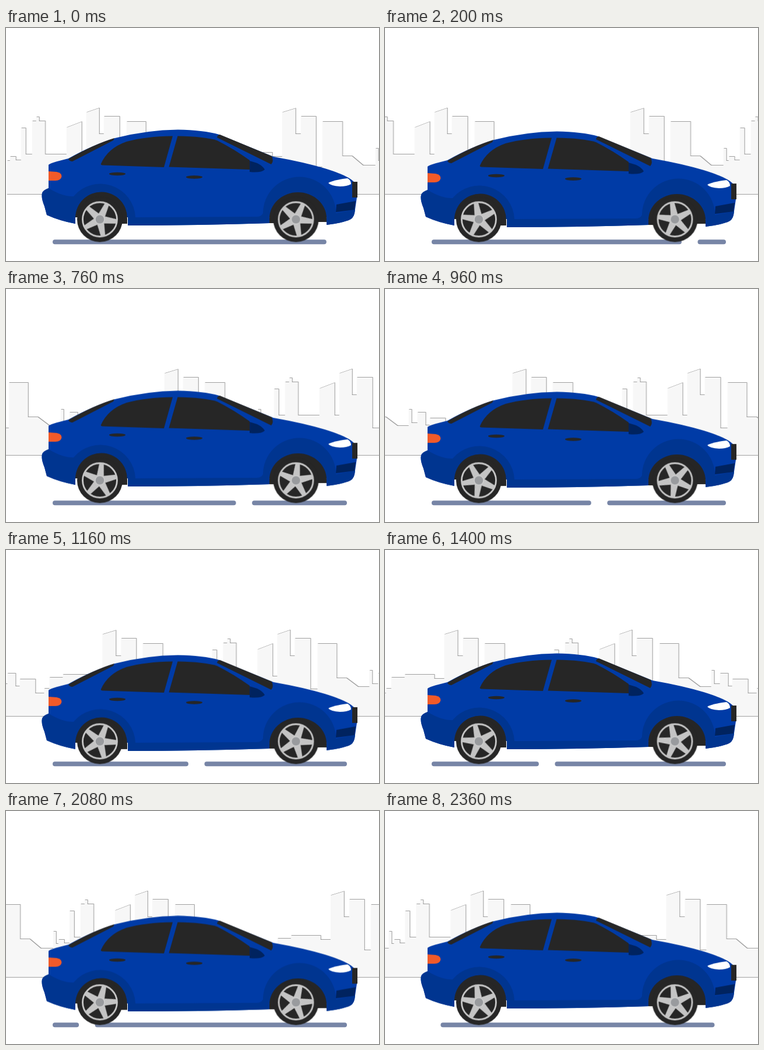
An HTML page for the animation above (2.4 s loop, 640 by 400 pixels).

```html
<!DOCTYPE html>
<html lang="en">
<head>
<meta charset="utf-8">
<title>Blue car driving past a city</title>
<style>
  html, body { margin: 0; width: 100%; height: 100%; overflow: hidden; background: #fff; }
  svg { display: block; width: 640px; height: 400px; }
  .city { animation: scroll 2400ms linear infinite; }
  .road { stroke-dasharray: 462 35.5; animation: road 2400ms linear infinite; }
  .body { animation: bob 400ms cubic-bezier(.37, 0, .63, 1) infinite alternate; }
  .spin { animation: spin 480ms linear infinite; }
  @keyframes scroll { to { transform: translateX(-638px); } }
  @keyframes road { to { stroke-dashoffset: 490px; } }
  @keyframes bob { to { transform: translateY(6px); } }
  @keyframes spin { to { transform: rotate(360deg); } }
</style>
</head>
<body>
<svg viewBox="0 0 640 400">
  <defs>
    <path id="skyline" d="M2 285V228H7V221H17V227H26V172H34V217H45V160H52V153H57V160H67.5V217H104V171L130 161V217H138V145L160 137.500V182H168V152H195V239H207V161H240V220H257L277 235H296V207H301V230H311V212H325V234H332V222H359V246H374V238H383V219H406V214H457V221H474V145L497 138V182H506V152H532V239H543V161H577.500V220H594L613 236H634V207H639V285Z"/>
    <g id="row">
      <use href="#skyline"/>
      <use href="#skyline" x="636"/>
      <use href="#skyline" x="1272"/>
    </g>
    <path id="spoke" d="M-6.500 -4L-3.800 -29H3.800L6.500 -4Z"/>
    <g id="wheel">
      <circle r="39" fill="#262626"/>
      <circle r="29.500" fill="none" stroke="#c9c9c9" stroke-width="2.800"/>
      <g class="spin" fill="#c4c4c4">
        <use href="#spoke"/>
        <use href="#spoke" transform="rotate(72)"/>
        <use href="#spoke" transform="rotate(144)"/>
        <use href="#spoke" transform="rotate(216)"/>
        <use href="#spoke" transform="rotate(288)"/>
      </g>
      <circle r="8.500" fill="#d2d2d2"/>
      <circle r="7.300" fill="#999b9e"/>
    </g>
  </defs>

  <g class="city">
    <use href="#row" x=".8" y="-.8" fill="#808080"/>
    <use href="#row" fill="#f7f7f7"/>
    <path d="M2 285.500H1911" stroke="#a0a0a0"/>
  </g>

  <path class="road" d="M84 367.300H581" fill="none" stroke="#7785a6" stroke-width="8" stroke-linecap="round"/>

  <g class="body">
    <path fill="#003ba6" d="M73 235Q74 232 107 224Q150 200 187 189Q242 175 295 174.500Q338 175 366 183L459 221Q510 230 547 241Q586 253 597 264L602 291L598 318Q596 327 588 330Q570 336 550 338V325H452V335Q330 339 209 339V325H119V336Q92 331 70 321L66 306Q60 292 62 283Q64 278 73 275Z"/>
    <path fill="#003590" d="M73 275Q64 278 62 284Q60 291 66 306L70 321Q92 331 119 336V325H209V339Q330 339 452 335V325H550V338Q570 336 588 330Q596 327 598 318L599 312L566 318A62 62 0 0 0 441 318Q438 324 430 324L222 325A60 60 0 0 0 116 289Q98 290 73 275Z"/>
    <g fill="#262626">
      <path d="M119 325A44.500 44.500 0 0 1 208 327V336H198L160 325Z"/>
      <path d="M452 335V327A49 45 0 0 1 550 327V333H530L500 325L470 335Z"/>
      <path d="M107 225Q150 200 186 189L184 193L114 229Q109 229 107 225Z"/>
      <path d="M163 233Q175 206 207 195Q240 186 286 185.500L271 239L166 235.500Q162 235 163 233Z"/>
      <path d="M294.500 185.500Q339 186 362 193Q390 207 418 227V243L279.500 238.500Z"/>
      <path d="M362 188Q363 183 367 183L456 220Q460 229 455 234Z"/>
      <ellipse cx="191" cy="250.500" rx="14" ry="2.700"/>
      <ellipse cx="323" cy="256" rx="14" ry="2.700"/>
    </g>
    <path fill="#00235f" d="M418 228L431 232Q441 237 444 243Q438 249 418 247ZM567 303L600 297L598 312L566 316Z"/>
    <path fill="#f15a29" d="M73 246L87 247Q96 249 95.500 255Q94 262 85 262H73Z"/>
    <path fill="#fff" d="M553 266Q562 261 586 258Q592 261 592 268Q585 272 573 272Q557 271 553 266Z"/>
    <path fill="#262626" d="M594 264H603V291H594Z"/>
  </g>

  <use href="#wheel" x="161" y="328.500"/>
  <use href="#wheel" x="497.500" y="328.500"/>
</svg>
</body>
</html>
```
